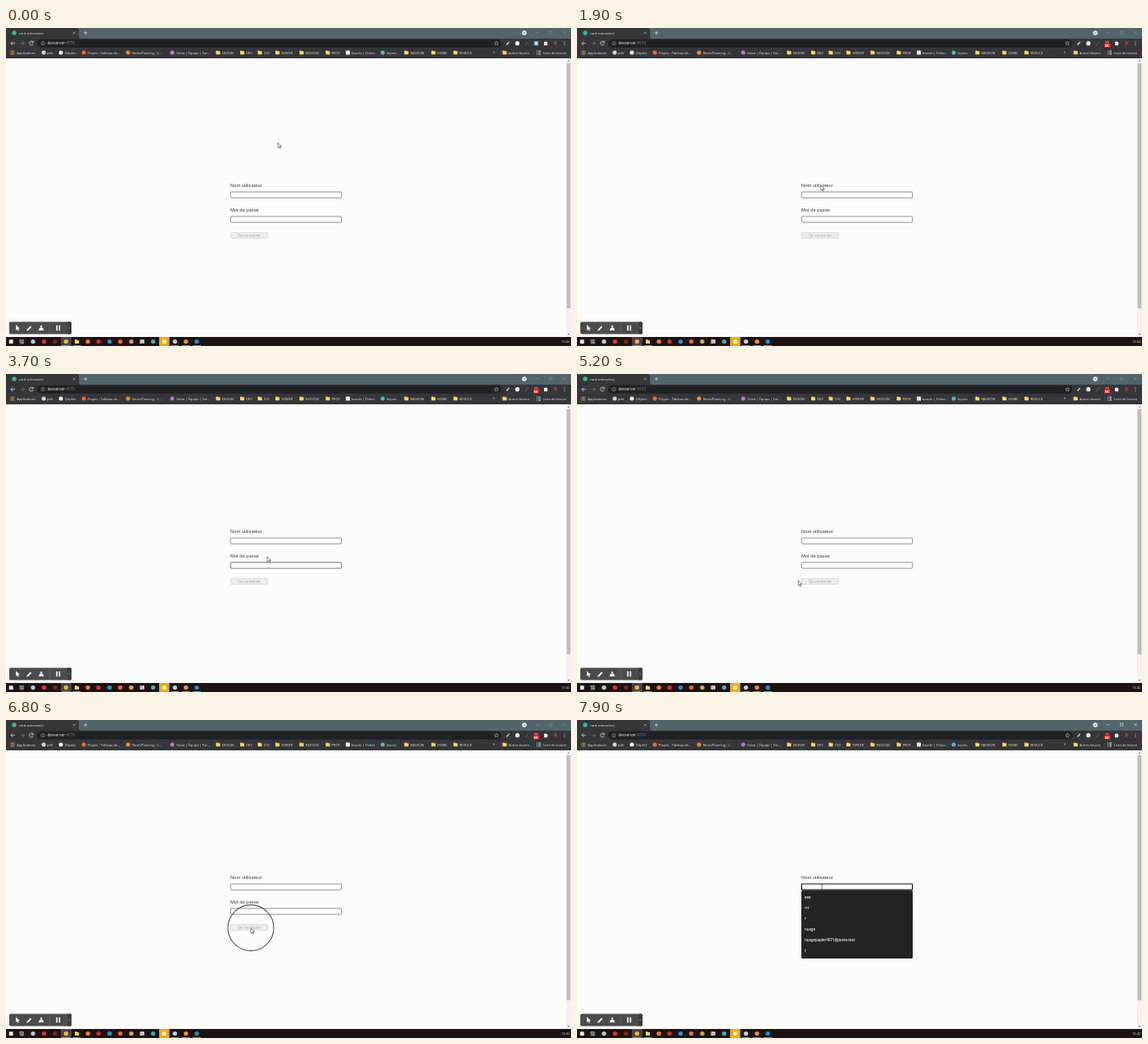
Write an HTML page that moves like this. It is 690x388 px and loops after 8 s.

```html
<!DOCTYPE html>
<html lang="fr">
<head>
<meta charset="utf-8">
<title>Formulaire</title>
<style>
html, body { margin: 0; width: 100%; height: 100%; overflow: hidden; background: #fcfcfc; }
svg { display: block; width: 100vw; height: 100vh; }
text { font-family: "Open Sans", "Noto Sans", sans-serif; white-space: pre; }
.form text { font-family: "Liberation Sans", Arial, sans-serif; }
</style>
</head>
<body>
<svg id="stage" viewBox="0 0 690 388" preserveAspectRatio="none"></svg>
<script>
const stage = document.getElementById('stage');

function add(parent, tag, attrs, content) {
  const node = document.createElementNS('http://www.w3.org/2000/svg', tag);
  for (const key in attrs) node.setAttribute(key, attrs[key]);
  if (content) node.textContent = content;
  parent.append(node);
  return node;
}
const group = (parent, attrs = {}) => add(parent, 'g', attrs);
const rect = (parent, x, y, width, height, fill, more = {}) =>
  add(parent, 'rect', { x, y, width, height, fill, ...more });
const dot = (parent, cx, cy, r, fill, more = {}) => add(parent, 'circle', { cx, cy, r, fill, ...more });
const line = (parent, d, stroke, width = 0.8, fill = 'none') =>
  add(parent, 'path', { d, stroke, 'stroke-width': width, fill });
const label = (parent, x, y, content, size, fill, more = {}) =>
  add(parent, 'text', { x, y, 'font-size': size, fill, ...more }, content);

function folder(parent, x, y, size = 5) {
  rect(parent, x - size / 2, y - size / 2, size / 2, 2, '#e5b93f', { rx: 0.5 });
  rect(parent, x - size / 2, y - size / 2 + 0.8, size, size - 1, '#ffd86b', { rx: 0.5 });
}

function drawTabs() {
  const g = group(stage);
  rect(g, 0, 0, 690, 14, '#53656a');
  add(g, 'path', { d: 'M0 13V0H86Q89 0 89 3V10Q89 13 92 13Z', fill: '#35363a' });
  dot(g, 10, 6, 2.7, '#41b883');
  label(g, 16, 7.7, 'card-estimation', 4.1, '#e4e6e8');
  line(g, 'M82 4.7l2.6 2.6M84.6 4.7l-2.6 2.6', '#d5d7d9', 0.6);
  line(g, 'M95 6h4M97 4v4', '#e8eaec', 0.7);
  dot(g, 633, 6, 2.8, '#f1f3f4');
  line(g, 'M631.7 5.3l1.3 1.5l1.3-1.5', '#40484c', 0.8);
  return line(g, 'M646.5 5.8h4M663.5 4h3.3v3.3h-3.3ZM680.3 3.8l3.6 3.6M683.9 3.8l-3.6 3.6', '#84959a', 0.6);
}

function drawToolbar() {
  const g = group(stage);
  rect(g, 0, 13, 690, 24, '#35363a');
  line(g, 'M11 18.7H6M8.2 16.4L5.9 18.7L8.2 21', '#d6d8da');
  line(g, 'M17.5 18.7h5M20.3 16.4l2.3 2.3l-2.3 2.3', '#77797d');
  line(g, 'M33 17.2a2.4 2.4 0 1 0 .2 2.3M33.3 15.7v2.2h-2.2', '#d6d8da');
  rect(g, 38, 13.8, 567, 10, '#202124', { rx: 5 });
  dot(g, 45, 18.7, 2.1, 'none', { stroke: '#bfc2c5', 'stroke-width': 0.5 });
  line(g, 'M45 18.4v1.5M45 17.3v.5', '#bfc2c5', 0.5);
  const address = label(g, 50.5, 20.4, 'devserver', 4.7, '#eceef0');
  add(address, 'tspan', { fill: '#8f9296' }, ':4170');
  line(g, 'M599 16.2l.7 1.7 1.8.1-1.4 1.2.5 1.8-1.6-1-1.6 1 .5-1.8-1.4-1.2 1.8-.1Z', '#cfd1d3', 0.5);
  line(g, 'M611.2 20.5l3.2-3.5', '#e5e5e5', 1.2);
  dot(g, 624.5, 18.7, 2.6, '#f2f2f2');
  line(g, 'M634.3 20.8l3.4-4', '#595b5f', 1.1);
  line(g, 'M657 17h1.3v-.8h1.2v.8h1.5v1.4h.8v1.2h-.8v1.6h-4Z', 'none', 0, '#f0f0f0');
  dot(g, 671, 18.7, 3.1, '#5a3430');
  label(g, 671, 20.1, 'T', 3.8, '#eee', { 'text-anchor': 'middle' });
  for (const y of [16.7, 18.7, 20.7]) dot(g, 682, y, 0.55, '#e7e7e7');

  const idle = group(g), recording = group(g);
  rect(idle, 644.8, 16, 5.4, 5.4, '#72a6d8', { rx: 1.4 });
  dot(idle, 647.5, 18.7, 1.5, '#f5f5f5');
  rect(recording, 645, 15.8, 5, 3, '#d94036', { rx: 0.8 });
  rect(recording, 643.8, 19, 7.4, 4.5, '#e32626', { rx: 0.7 });
  label(recording, 647.5, 22.5, 'REC', 3, '#fff', { 'text-anchor': 'middle', 'font-weight': 700 });
  return { idle, recording };
}

function drawBookmarks() {
  const g = group(stage);
  const colours = ['#e56a54', '#f1b83c', '#69ae65'];
  for (let i = 0; i < 9; i++)
    rect(g, 5.2 + (i % 3) * 1.9, 27.6 + Math.floor(i / 3) * 1.9, 1.3, 1.3, colours[i % 3]);
  const text = (x, content) => label(g, x, 31.5, content, 4, '#e6e8ea');
  text(13.3, 'Applications');
  [[46, '#d5d7da', 50, 'prêt'], [67, '#f4f4f4', 72, 'Dépôts'],
   [95, '#ef6b2d', 99.5, 'Projets - Tableau de...'], [149, '#ed8f35', 154, "NotesPlanning - L'..."],
   [203, '#b77ac6', 208, 'Salon | Équipe | For...'], [460, '#55b9c4', 465, 'leçons']
  ].forEach(([x, colour, tx, name]) => { dot(g, x, 30, 2.5, colour); text(tx, name); });
  rect(g, 415, 27.6, 5, 5, '#f1f1f1', { rx: 0.6 });
  text(422, 'boucle | Fiches');
  [[259, 'DESIGN'], [288.5, 'DEV'], [310, 'CSS'], [331.5, 'SERVER'], [361, 'NOCODE'],
   [393, 'PROF'], [489, 'FASHION'], [522, 'HOME'], [549, 'REDUCE'], [609, 'Autres favoris']
  ].forEach(([x, name]) => { folder(g, x, 30); text(x + 4.7, name); });
  label(g, 594.5, 31.3, '»', 5, '#eee');
  line(g, 'M604.5 27v6M645 27v6', '#55575b', 0.5);
  line(g, 'M648 28h1M650 28h3M648 30h1M650 30h3M648 32h1M650 32h3', '#e2e4e6', 0.9);
  text(656, 'Liste de lecture');
}

function drawPage() {
  rect(stage, 0, 37, 690, 340, '#fcfcfc');
  rect(stage, 684, 37, 6, 340, '#f1f1f1');
  rect(stage, 684.8, 43, 4.4, 299, '#bdbdbd');
  line(stage, 'M685.8 40.8l1.2-1.4 1.2 1.4ZM685.8 373l1.2 1.4 1.2-1.4Z', 'none', 0, '#555');

  const form = group(stage, { class: 'form' });
  label(form, 274, 194.2, 'Nom utilisateur', 5.8, '#34414c');
  label(form, 274, 224.2, 'Mot de passe', 5.8, '#34414c');
  const field = y => rect(form, 274.3, y, 135.3, 7.2, '#fff', { rx: 0.7, 'stroke-width': 0.8 });
  const user = field(200), password = field(229.9);
  rect(form, 274.3, 249.6, 45, 6.9, '#efefef', { rx: 0.7, stroke: '#d2d2d2', 'stroke-width': 0.7 });
  label(form, 297, 254.7, 'Se connecter', 4.8, '#ababab', { 'text-anchor': 'middle' });

  const menu = group(stage);
  rect(menu, 274, 208, 136, 83, '#242426', { rx: 1.5 });
  ['eee', 'rrr', 'r', 'nuage', 'nuagepapier4071@poste.test', 't'].forEach((name, i) =>
    label(menu, 278, 218.4 + i * 12.95, name, 4.35, '#f3f3f3', { 'font-weight': 600 }));
  return { user, password, menu };
}

function drawRecorder() {
  const g = group(stage);
  rect(g, 4, 358.5, 76, 15, '#4b4c4e', { rx: 1.8 });
  line(g, 'M12 362.3v6.5l1.6-1.4 1.1 2.3 1.2-.6-1.1-2.2h2.1Z', 'none', 0, '#fff');
  line(g, 'M26.5 368.4l4-4.3', '#fff', 1.9);
  line(g, 'M25.2 369.6l.5-2 1.5 1.4Z', 'none', 0, '#fff');
  line(g, 'M43 362.2l1.6 3.2h-3.2ZM40.9 366h4.2l1.2 3h-6.6Z', 'none', 0, '#fff');
  line(g, 'M53.3 360v12', '#727375', 0.5);
  line(g, 'M62.1 362.8v6.4M65.3 362.8v6.4', '#fff', 1.6);
  rect(g, 75, 358.5, 5, 15, '#3b3c3e', { rx: 1.5 });
  line(g, 'M77.8 364.8l-1.1 1.2 1.1 1.2', '#c8c8c8', 0.6);
}

function drawTaskbar() {
  const g = group(stage);
  rect(g, 0, 377, 690, 11, '#1d1313');
  rect(g, 67, 377, 13, 11, '#4b4242');
  rect(g, 187, 377, 12.5, 11, '#e8ad19');
  rect(g, 3.8, 380.3, 4.8, 4.8, '#f0f0f0');
  line(g, 'M16.8 380.6h4.5v1.5h-4.5ZM16.8 383.4h4.5v1.5h-4.5', '#ddd', 0.7);
  [[33, '#b9cad6'], [46.5, '#e13239'], [60, '#7c2424'], [73.3, '#e9b64a'], [100, '#f27d32'],
   [113, '#d72c36'], [126.5, '#2e91c8'], [139.5, '#ef6938'], [153, '#d8a755'], [179.7, '#4ba7bd'],
   [206.3, '#bfd2de'], [219.8, '#ee9430'], [233, '#268bd2']
  ].forEach(([x, colour]) => dot(g, x, 382.6, 2.7, colour));
  folder(g, 86.5, 382.6);
  rect(g, 163.5, 380.3, 5.4, 4.7, '#dedede', { rx: 0.5 });
  line(g, 'M164.4 381.5l1.2 1-1.2 1M166.2 384h1.8', '#333', 0.6);
  rect(g, 191, 380.5, 4.5, 4.5, '#fff3c8');
  for (const x of [73.3, 86.5, 206.3, 219.8, 233]) rect(g, x - 5, 387, 10, 1, '#bd7777');
  label(g, 678, 384.2, '12:42', 4, '#eee');
}

const controls = drawTabs();
const badge = drawToolbar();
drawBookmarks();
const page = drawPage();
drawRecorder();
drawTaskbar();

const ring = dot(stage, 0, 0, 28, 'none', { stroke: '#555', 'stroke-width': 1.1 });
const arrow = line(stage, 'M0 0V6.2L1.5 4.9L2.5 7.1L3.5 6.6L2.5 4.5H4.5Z', '#333', 0.6, '#fff');
const beam = line(stage, 'M-1.2-3h2.4M0-3v6.2M-1.2 3.2h2.4', '#333', 0.6);

// Pointer stops: time, x, y
const stops = [
  [0, 332, 140], [700, 332, 140], [1700, 297.5, 192], [2100, 298, 192],
  [2800, 326, 195], [3000, 325, 195], [3700, 319, 223], [4100, 318, 223],
  [5100, 270, 252], [5400, 271, 252], [6400, 299, 254], [7100, 299, 254],
  [7500, 299, 204], [8000, 299, 204]
];

function pointerAt(t) {
  const i = stops.findIndex(stop => stop[0] > t);
  const [t0, x0, y0] = stops[i - 1], [t1, x1, y1] = stops[i];
  const u = (t - t0) / (t1 - t0), ease = u * u * (3 - 2 * u);
  return [x0 + (x1 - x0) * ease, y0 + (y1 - y0) * ease];
}

const show = (node, visible) => node.setAttribute('display', visible ? 'inline' : 'none');

function render(t) {
  const [x, y] = pointerAt(t);
  const focused = t >= 7500;
  for (const node of [arrow, beam]) node.setAttribute('transform', `translate(${x} ${y})`);
  show(arrow, !focused);
  show(beam, focused);
  ring.setAttribute('cx', x);
  ring.setAttribute('cy', y - 0.4);
  show(ring, t >= 6600 && t < 7100);
  show(badge.idle, t < 500);
  show(badge.recording, t >= 500);
  show(page.menu, t >= 7700);
  controls.setAttribute('stroke', t >= 7300 ? '#f0f2f3' : '#84959a');
  page.user.setAttribute('stroke', focused ? '#111' : '#777');
  page.user.setAttribute('stroke-width', focused ? 1.2 : 0.8);
  page.password.setAttribute('stroke', t >= 3500 && t < 4300 ? '#555' : '#777');
}

const start = performance.now();
function tick() {
  const elapsed = (performance.now() - start) % 8000;
  render(Math.floor(elapsed / 100) * 100);
  requestAnimationFrame(tick);
}
tick();
</script>
</body>
</html>
```
